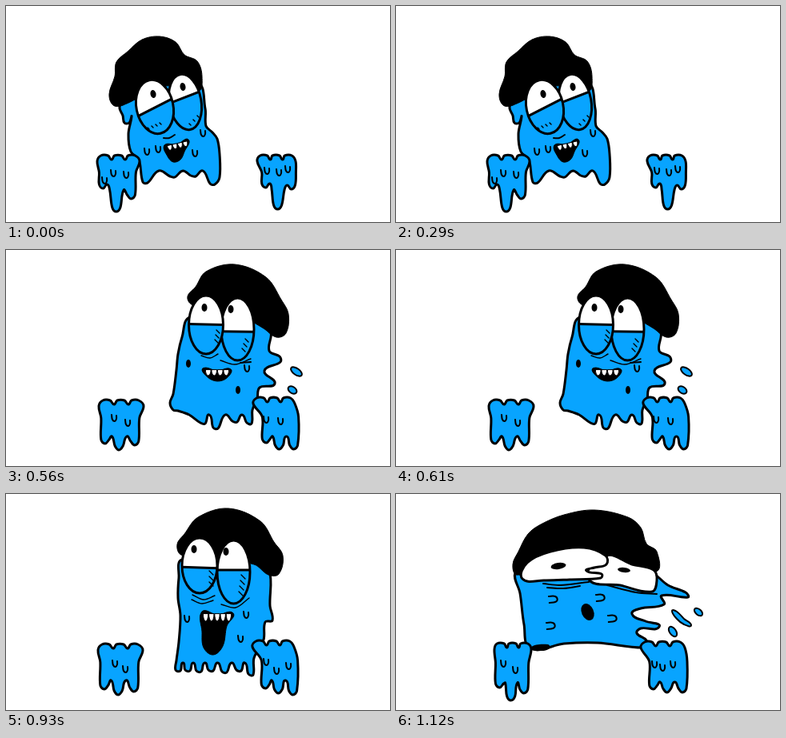
An HTML page with a canvas that plays this animation: 480 by 270 pixels, repeating every 1.2 s.

```html
<!DOCTYPE html>
<html lang="en">
<head>
<meta charset="utf-8">
<title>Slime looking around</title>
<style>
  html, body { margin: 0; width: 100%; height: 100%; overflow: hidden; background: #fff; }
  /* Poses sit side by side; the strip jumps one stage width at a time. */
  canvas { display: block; width: 500vw; height: 100vh; animation: poses 1200ms step-end infinite; }
  @keyframes poses {
    0% { transform: translateX(0); }
    40% { transform: translateX(-20%); }
    46.6667% { transform: translateX(-40%); }
    53.3333% { transform: translateX(-60%); }
    93.3333%, 100% { transform: translateX(-80%); }
  }
</style>
</head>
<body>
<canvas id="strip" width="2400" height="270"></canvas>
<script>
const c = document.getElementById('strip').getContext('2d');
const BLUE = '#08a4ff', WHITE = '#fff', BLACK = '#000';
c.lineJoin = c.lineCap = 'round';

const pairs = a => a.flatMap((v, i) => i % 2 ? [] : [[v, a[i + 1]]]);

function ink(fill, width) {
  if (fill) { c.fillStyle = fill; c.fill(); }
  if (width) { c.lineWidth = width; c.stroke(); }
}

// Smooth curve through points, with handles scaled to each segment.
function curve(flat, closed) {
  const p = pairs(flat), n = p.length;
  const at = i => closed ? p[(i + n) % n] : p[Math.max(0, Math.min(n - 1, i))];
  const dir = i => {
    const [a, b] = [at(i - 1), at(i + 1)];
    const x = b[0] - a[0], y = b[1] - a[1], d = Math.hypot(x, y) || 1;
    return [x / d, y / d];
  };
  c.beginPath();
  c.moveTo(...p[0]);
  for (let i = 0; i < (closed ? n : n - 1); i++) {
    const a = at(i), b = at(i + 1), u = dir(i), v = dir(i + 1);
    const k = Math.hypot(b[0] - a[0], b[1] - a[1]) * .34;
    c.bezierCurveTo(a[0] + u[0] * k, a[1] + u[1] * k, b[0] - v[0] * k, b[1] - v[1] * k, ...b);
  }
  if (closed) c.closePath();
}
const blob = (fill, pts, width = 3) => { curve(pts, true); ink(fill, width); };
const line = (pts, width = 2) => { curve(pts); ink(null, width); };
const body = pts => blob(BLUE, pts);
const hat = pts => blob(BLACK, pts, 1);

function oval(fill, x, y, rx, ry, deg = 0, width = 0) {
  c.beginPath();
  c.ellipse(x, y, rx, ry, deg * Math.PI / 180, 0, 7);
  ink(fill, width);
}

// Hanging drips: given tips, with a valley between each two.
function fringe(base, tips) {
  return pairs(tips).flatMap(([x, y], i, all) => [
    ...(i ? [(all[i - 1][0] + x) / 2, base] : []),
    x - 3, y - 3, x + 3, y - 2
  ]);
}

const drops = pts => pairs(pts).forEach(([x, y]) => line([x - 3, y - 2, x - 2, y + 4, x + 1, y + 6, x + 3, y + 3, x + 3, y - 1]));
const curls = (pts, s = 1) => pairs(pts).forEach(([x, y]) => line([x + 9 * s, y - 4, x, y - 4, x - 3 * s, y, x, y + 3, x + 8 * s, y + 4]));

function hatch(x, y, n, dx, dy, len = 4) {
  for (let i = 0; i < n; i++) line([x + dx * i, y + dy * i, x + dx * i + len, y + dy * i + len], 1.4);
}

function hand(x, top, base, tips, w, skew, marks) {
  const tipX = [.14, .45, .8].map(f => x + skew + w * f);
  const mid = (top + base) / 2, pts = [x, top + 8];
  for (let i = 0; i < 3; i++) {
    const f = x + w * (.18 + .32 * i);
    pts.push(f - 5, top + 1, f + 4, top + 1);
    if (i < 2) pts.push(f + w * .16, top + 6);
  }
  pts.push(x + w, top + 8, tipX[2] + 6, mid);
  for (let i = 2; i >= 0; i--) {
    const t = tipX[i];
    pts.push(t + 5, tips[i] - 5, t, tips[i], t - 5, tips[i] - 5);
    if (i) pts.push((t + tipX[i - 1]) / 2, base);
  }
  pts.push(tipX[0] - 5, mid);
  blob(BLUE, pts);
  drops(marks);
}

// Egg eye: white above the lid line, blue below.
function eye(x, y, rx, ry, tilt, lid, slope, px, py) {
  oval(BLUE, x, y, rx, ry, tilt);
  c.save();
  c.clip();
  c.translate(x, lid);
  c.rotate(slope * Math.PI / 180);
  c.beginPath();
  c.rect(-60, -90, 120, 90);
  ink(WHITE, 3);
  c.restore();
  oval(null, x, y, rx, ry, tilt, 3);
  oval(BLACK, px, py, 3.5, 5, tilt);
}

function teeth(x, y, x2, y2, n, h) {
  const w = (x2 - x) / n;
  for (let i = 0; i < n; i++) {
    c.beginPath();
    c.ellipse(x + w * (i + .5), y + (y2 - y) * (i + .5) / n, w * .45, h, Math.atan2(y2 - y, x2 - x), 0, Math.PI);
    c.closePath();
    ink(WHITE, 1);
  }
}

function leanLeft() {
  body([150,117, 142,126, 146,137, 148,146, 154,146, 157,138, 153,160, 156,182, 166,192,
    ...fringe(206, [174,223, 208,216, 234,215, 258,225]),
    267,214, 267,185, 264,166, 258,158, 250,150, 249,128, 238,95, 160,108]);
  hat([146,124, 134,124, 129,110, 136,88, 138,70, 152,57, 170,42, 192,38, 212,45, 223,61, 239,69, 245,88, 240,107, 200,100]);
  eye(224, 120, 20, 35, -10, 114, -21, 221, 101);
  eye(186, 126, 23, 34, -12, 127, -27, 184, 110);
  hatch(177, 152, 4, 5, -2, 2);
  hatch(229, 147, 3, 5, -5, 2);
  line([197,165, 204,165, 211,161]);
  blob(BLACK, [198,174, 214,173, 228,167, 223,182, 218,192, 209,195, 202,188], 1);
  teeth(201, 175, 227, 169, 4, 6);
  drops([176,180, 190,177, 236,182, 246,157]);
  hand(114, 186, 230, [228, 257, 241], 53, 0, [134,207, 150,209, 123,216]);
  hand(314, 186, 230, [227, 254, 229], 48, 4, [326,204, 341,206, 352,202]);
}

function smearRight() {
  body([225,74, 216,90, 213,110, 203,113, 191,114, 192,124, 205,126, 210,134, 194,141, 194,149, 211,153,
    205,160, 190,162, 191,172, 206,175, 203,184, 207,192,
    ...fringe(205, [197,215, 228,222, 258,215, 289,223]),
    308,208, 327,184, 333,160, 337,146, 336,130, 341,105, 325,80]);
  hat([218,80, 212,68, 217,57, 227,46, 250,30, 284,26, 325,40, 341,60, 352,76, 352,95, 342,104, 330,100, 310,80, 265,71]);
  blob(WHITE, [209,104, 208,95, 225,90, 251,90, 247,107, 230,106, 213,109]);
  blob(WHITE, [249,95, 262,89, 294,91, 331,94, 330,102, 336,108, 300,117, 260,116, 247,106]);
  line([219,89, 240,85, 285,86, 316,91]);
  line([216,116, 246,111]);
  line([265,120, 296,124, 328,115]);
  line([222,102, 230,102], 4);
  line([281,100, 291,100], 4);
  curls([226,126, 250,132, 286,145, 278,171]);
  line([229,176, 234,182, 249,181]);
  blob(BLACK, [229,150, 244,148, 259,152, 250,160, 230,159], 1);
  oval(BLUE, 174, 131, 9, 4, -20, 2);
  oval(BLUE, 161, 159, 13, 4.5, -25, 2);
  hand(116, 187, 233, [243, 251, 247], 56, 0, [131,207, 153,207]);
  hand(309, 184, 234, [241, 251, 250], 52, 9, [325,208, 346,210]);
}

function splashRight() {
  body([230,84, 220,109, 215,130, 213,150, 209,180, 205,191,
    ...fringe(206, [212,203, 246,219, 262,225, 286,217, 304,219]),
    308,200, 314,186, 317,172, 336,167, 323,151, 343,140, 342,133, 329,126, 331,102, 315,82]);
  hat([232,68, 227,58, 237,46, 250,27, 286,18, 325,34, 344,62, 353,80, 350,104, 338,109, 322,98, 300,86, 265,75]);
  eye(289.5, 99, 20.5, 39, 0, 102, 1, 281, 74);
  eye(250, 93.5, 21.5, 36.5, 0, 93, 1, 248, 72);
  hatch(263, 100, 3, -1, 6);
  hatch(299, 111, 3, -2, 6);
  line([244,132, 255,135, 265,130], 1.4);
  line([268,138, 286,143, 306,136], 1.4);
  blob(BLACK, [246,148, 264,151, 281,149, 276,160, 264,164, 252,159], 1);
  teeth(249, 150, 279, 150, 4, 7);
  oval(BLACK, 228, 142, 3, 5);
  oval(BLACK, 290, 175, 3, 5);
  drops([301,146]);
  line([293,141, 306,140]);
  oval(BLUE, 363, 152, 8, 4, 35, 2);
  oval(BLUE, 358, 175, 6, 4, 35, 2);
  hand(116, 187, 233, [242, 250, 244], 56, 0, [135,208, 152,214]);
  hand(309, 184, 233, [241, 249, 249], 52, 9, [325,210, 343,212]);
}

function settleRight() {
  body([220,82, 216,105, 215,130, 218,152, 216,185, 213,208,
    ...fringe(211, [215,223, 227,223, 241,224, 256,223, 273,225, 291,223, 306,228]),
    310,205, 322,182, 324,160, 333,158, 330,140, 329,95, 310,78]);
  hat([219,76, 214,63, 223,50, 240,29, 278,18, 318,34, 335,60, 346,77, 341,100, 328,101, 310,88, 265,82]);
  eye(284.5, 97.5, 20.5, 39.5, 0, 95, 0, 275, 72);
  eye(242, 89.5, 22, 34.5, 0, 92, 2, 235, 69);
  hatch(254, 96, 3, 0, 7, 5);
  hatch(294, 101, 4, -1, 7, 5);
  line([233,126, 247,132, 261,127], 1.4);
  line([232,132, 245,137, 259,133], 1.4);
  line([269,138, 287,142, 304,130], 1.4);
  blob(BLACK, [245,147, 264,151, 284,149, 276,165, 271,190, 259,201, 247,192, 245,172], 1);
  teeth(246, 150, 282, 150, 5, 9);
  drops([226,154, 300,149, 293,179]);
  hand(115, 187, 233, [244, 251, 247], 56, 0, [136,210, 149,217]);
  hand(308, 183, 233, [243, 249, 251], 52, 9, [325,208, 338,219, 353,213]);
}

function smearLeft() {
  body([149,98, 155,124, 160,163, 168,193, 210,187, 252,186, 312,192, 313,183, 301,174, 306,168, 329,166,
    312,159, 295,150, 306,143, 335,138, 332,127, 365,129, 362,123, 340,114, 323,100, 290,80, 170,80]);
  hat([151,101, 146,88, 153,72, 165,50, 181,38, 210,26, 248,20, 290,29, 306,42, 313,62, 326,72, 325,97, 240,94]);
  blob(WHITE, [263,77, 295,88, 322,95, 326,108, 320,122, 280,114, 240,105]);
  blob(WHITE, [158,106, 164,86, 193,72, 235,67, 262,77, 263,88, 248,92, 238,96, 257,100, 256,105, 217,107, 185,108]);
  oval(BLACK, 203, 90, 9.5, 4, -9);
  oval(BLACK, 285, 95, 8, 3, 7);
  line([184,112, 205,114, 241,110]);
  line([189,117, 209,118, 230,115]);
  line([264,114, 300,123, 326,125]);
  oval(BLACK, 239.5, 147.5, 7.5, 11, -24);
  curls([199,132, 258,130, 196,165, 273,156], -.9);
  blob(BLACK, [168,192, 190,188, 192,193, 180,196], 0);
  blob(BLUE, [345,146, 351,147, 360,156, 369,164, 360,163, 351,156], 2);
  oval(BLUE, 378, 147.5, 6, 3.5, 40, 2);
  oval(BLUE, 346, 172, 7, 4, 55, 2);
  hand(123, 186, 236, [242, 258, 249], 46, 0, [134,210, 149,218]);
  hand(306, 184, 235, [244, 248, 248], 55, 8, [323,211, 333,215, 346,211]);
}

[leanLeft, smearRight, splashRight, settleRight, smearLeft].forEach((pose, i) => {
  c.save();
  c.translate(480 * i, 0);
  pose();
  c.restore();
});
</script>
</body>
</html>
```
